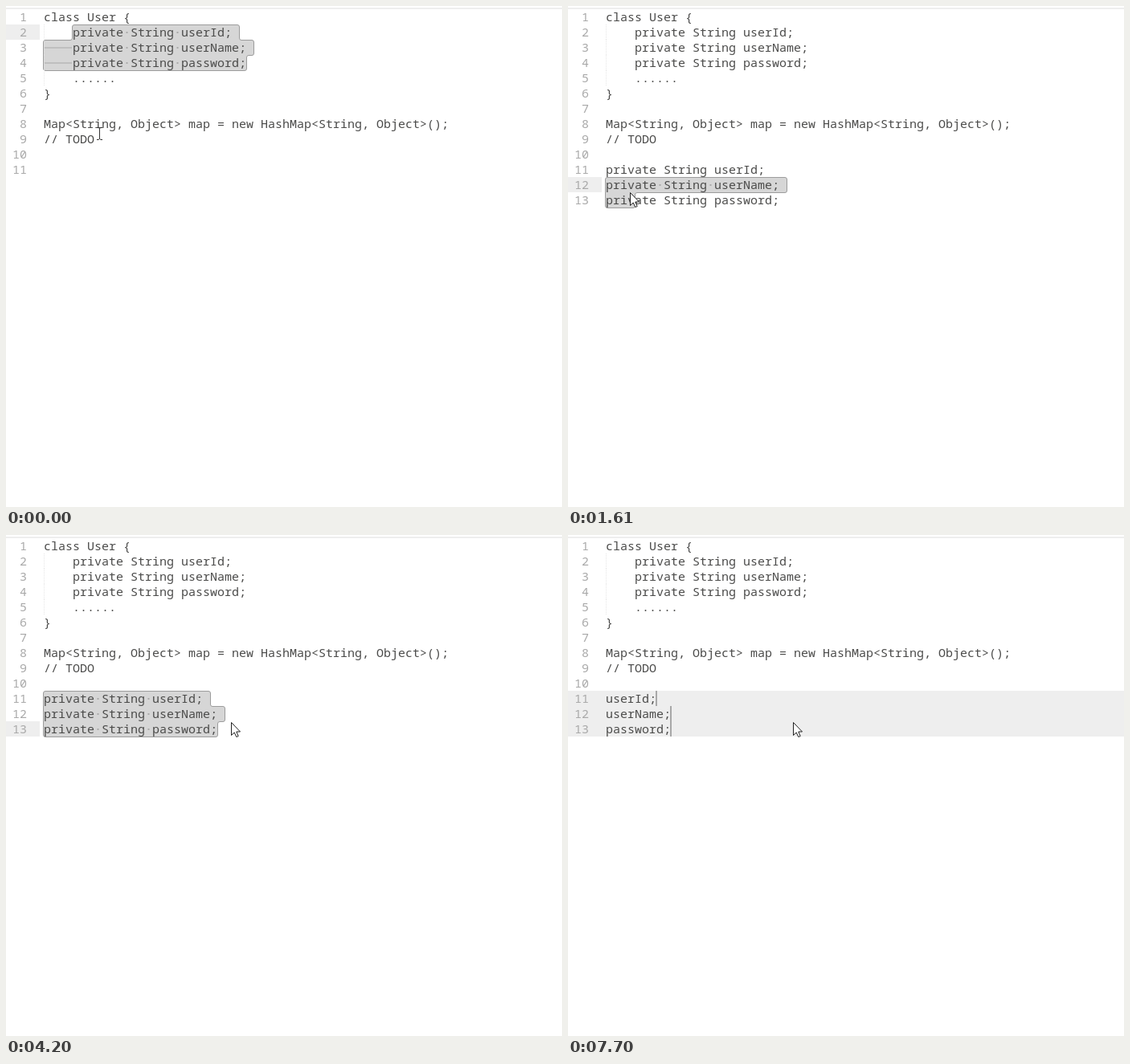
An HTML page for the animation above (8000 ms loop, 692 by 624 pixels).

```html
<!DOCTYPE html>
<html lang="en">
<head>
<meta charset="utf-8">
<title>Multi-cursor editing</title>
<style>
html, body { margin: 0; width: 100%; height: 100%; overflow: hidden; background: #fff; }
svg { display: block; width: 692px; height: 624px; }
text { font: 15px "Noto Sans Mono", "DejaVu Sans Mono", monospace; white-space: pre; fill: #4b4b4a; }
.num { fill: #a9a9a9; text-anchor: end; }
.row { fill: #eee; }
.sel { fill: #d6d6d6; stroke: #9c9c9c; }
.caret { fill: #a8a8a8; }
.space { fill: #aaa; }
.guide { stroke: #e6e6e6; stroke-dasharray: 1 1; }
</style>
</head>
<body>
<svg id="stage" viewBox="0 0 692 624"></svg>
<script>
const LOOP = 8000, TICK = 70;
const LEFT = 47, CHAR = 9, ROW = 19;
const stage = document.getElementById('stage');

const TAB = '    ';
const fields = ['userId;', 'userName;', 'password;'];
const decl = fields.map(f => 'private String ' + f);
const head = ['class User {', ...decl.map(d => TAB + d), TAB + '......', '}', '',
  'Map<String, Object> map = new HashMap<String, Object>();', '// TODO', ''];
const pasted = [decl[0], TAB + decl[1], TAB + decl[2]];

// Pointer steps: time, x, y, shape ('I' beam or 'A' arrow)
const pointer = [
  [0, 116, 159, 'I'], [70, 117, 165, 'I'], [350, 120, 206, 'I'], [630, 120, 210, 'I'],
  [770, 120, 237, 'I'], [910, 124, 250, 'I'], [980, 122, 248, 'I'], [1050, 108, 244, 'I'],
  [1120, 94, 230, 'I'], [1330, 84, 225, 'I'], [1400, 80, 226, 'A'], [1610, 77, 232, 'A'],
  [1890, 76, 232, 'A'], [2170, 64, 231, 'A'], [2450, 64, 231, 'A'], [2660, 52, 212, 'I'],
  [2870, 48, 211, 'I'], [2940, 48, 210, 'I'], [3220, 112, 226, 'I'], [3570, 220, 244, 'I'],
  [3920, 267, 247, 'I'], [3990, 270, 244, 'A'], [4200, 280, 233, 'A'], [8000, 280, 233, 'A']
];

// Width of the column selection over time
const columns = [[5390, 1], [5950, 2], [6020, 3], [6090, 5], [6160, 7], [6230, 10],
  [6300, 12], [6440, 13], [6580, 14], [6790, 15]];

const topOf = line => 4 + ROW * (line - 1);
const xOf = col => LEFT + CHAR * col;
const clamp = (v, lo, hi) => Math.max(lo, Math.min(hi, v));
const escapeText = s => s.replace(/&/g, '&amp;').replace(/</g, '&lt;');

function pointerAt(t) {
  let i = 0;
  while (i < pointer.length - 2 && pointer[i + 1][0] <= t) i++;
  const [t0, x0, y0, kind] = pointer[i], [t1, x1, y1] = pointer[i + 1];
  const k = (t - t0) / (t1 - t0);
  return { x: Math.round(x0 + (x1 - x0) * k), y: Math.round(y0 + (y1 - y0) * k), kind };
}

// A region is [anchor line, anchor column, head line, head column]
function dragTo(lines, line, col, t) {
  const p = pointerAt(t);
  const row = clamp(Math.floor((p.y - 4) / ROW) + 1, 1, lines.length);
  return [line, col, row, clamp(Math.round((p.x - LEFT) / CHAR), 0, lines[row - 1].length)];
}

const eachRow = (from, to) => [0, 1, 2].map(i => [11 + i, from(i), 11 + i, to(i)]);

function stateAt(t) {
  const start = () => 0;
  const flat = [...head, ...decl];
  if (t < 630) {
    const lines = [...head, ''];
    return { lines, regions: [t < 350 ? [4, 28, 2, 4] : [11, 0, 11, 0]] };
  }
  if (t < 2310) {
    const lines = [...head, ...pasted];
    if (t < 980) return { lines, regions: [[13, 28, 13, 28]] };
    const r = dragTo(lines, 13, 8, Math.min(t, 1330));
    if (t < 1470) return { lines, regions: [r] };
    return { lines: flat, regions: [[r[0], r[1] - 4, r[2], Math.max(0, r[3] - 4)]] };
  }
  if (t < 2940) return { lines: flat, regions: [[12, 2, 12, 2]] };
  if (t < 4550) return { lines: flat, regions: [dragTo(flat, 11, 0, Math.min(t, 3920))] };
  const end = list => i => list[i].length;
  if (t < 4970) return { lines: flat, regions: eachRow(start, end(decl)) };
  if (t < 5390) return { lines: flat, regions: eachRow(start, start) };
  if (t < 7210) {
    const width = columns.filter(c => c[0] <= t).pop()[1];
    return { lines: flat, regions: eachRow(start, () => width), caret: t >= 5670 && t < 6020 };
  }
  const to = t < 7700 ? start : end(fields);
  return { lines: [...head, ...fields], regions: eachRow(to, to) };
}

function spansOf([al, ac, hl, hc], lines) {
  const back = hl < al || (hl === al && hc < ac);
  const [l0, c0, l1, c1] = back ? [hl, hc, al, ac] : [al, ac, hl, hc];
  const spans = [];
  for (let l = l0; l <= l1; l++)
    spans.push([l, l === l0 ? c0 : 0, l === l1 ? c1 : lines[l - 1].length + 1]);
  return spans;
}

// Closed polygon with small rounded corners
function roundPath(points) {
  const pts = points.filter((p, i) => {
    const q = points[(i + 1) % points.length];
    return p[0] !== q[0] || p[1] !== q[1];
  });
  const toward = (p, q) => {
    const d = Math.hypot(q[0] - p[0], q[1] - p[1]), k = Math.min(2.5, d / 2) / d;
    return [p[0] + (q[0] - p[0]) * k, p[1] + (q[1] - p[1]) * k];
  };
  return pts.map((p, i) => {
    const a = toward(p, pts[(i + pts.length - 1) % pts.length]);
    const b = toward(p, pts[(i + 1) % pts.length]);
    return `${i ? 'L' : 'M'}${a}Q${p} ${b}`;
  }).join('') + 'Z';
}

function selection(spans) {
  const right = [], left = [];
  for (const [l, a, b] of spans) {
    const y = topOf(l) + .5;
    right.push([xOf(b) + .5, y], [xOf(b) + .5, y + ROW]);
    left.unshift([xOf(a) - .5, y + ROW], [xOf(a) - .5, y]);
  }
  return `<path class="sel" d="${roundPath([...right, ...left])}"/>`;
}

function whitespace(spans, lines) {
  let out = '';
  for (const [l, a, b] of spans) {
    const s = lines[l - 1], y = topOf(l) + 10, indent = s.startsWith(TAB) ? 4 : 0;
    if (indent && a === 0 && b >= 4) out += rect('space', xOf(0) + 1, y - .5, 34, 1);
    for (let c = Math.max(a, indent); c < Math.min(b, s.length); c++)
      if (s[c] === ' ') out += rect('space', xOf(c) + 3.5, y - 1, 2, 2);
  }
  return out;
}

const rect = (cls, x, y, w, h) =>
  `<rect class="${cls}" x="${x}" y="${y}" width="${w}" height="${h}"/>`;

function textLine(s, i) {
  const y = topOf(i + 1) + 15, indent = s.startsWith(TAB) ? 4 : 0;
  const guide = indent
    ? `<path class="guide" d="M${LEFT + .5} ${topOf(i + 1)}v${ROW}"/>` : '';
  return guide + `<text class="num" x="26" y="${y}">${i + 1}</text>` +
    `<text x="${xOf(indent)}" y="${y}">${escapeText(s.slice(indent))}</text>`;
}

function pointerShape({ x, y, kind }) {
  const d = kind === 'I'
    ? 'M-3 -7.5H-1L.5 -6.5L2 -7.5H4M.5 -6.5V6.5M-3 7.5H-1L.5 6.5L2 7.5H4'
    : 'M.5 .5V16.5L4.2 13L6.8 18.5L9.2 17.5L6.8 12H11.5Z';
  const paint = kind === 'I' ? 'fill="none" stroke="#333"' : 'fill="#fff" stroke="#222"';
  return `<path transform="translate(${x} ${y})" d="${d}" ${paint}/>`;
}

function draw(t) {
  const { lines, regions, caret } = stateAt(t);
  let rows = '', sels = '', marks = '', carets = '';
  for (const r of regions) {
    const [al, ac, hl, hc] = r, empty = al === hl && ac === hc;
    rows += rect('row', 0, topOf(hl), empty ? 692 : 42, ROW);
    if (!empty) {
      const spans = spansOf(r, lines);
      sels += selection(spans);
      marks += whitespace(spans, lines);
    }
    if (empty || caret) carets += rect('caret', xOf(hc) - 1, topOf(hl), 2, ROW);
  }
  stage.innerHTML = rect('row', 0, 2, 692, 2) + rows + sels + lines.map(textLine).join('') +
    marks + carets + pointerShape(pointerAt(t));
}

const begin = performance.now();
let last = -1;
function tick() {
  const t = Math.floor(((performance.now() - begin) % LOOP) / TICK) * TICK;
  if (t !== last) draw(last = t);
  requestAnimationFrame(tick);
}
tick();
</script>
</body>
</html>
```
